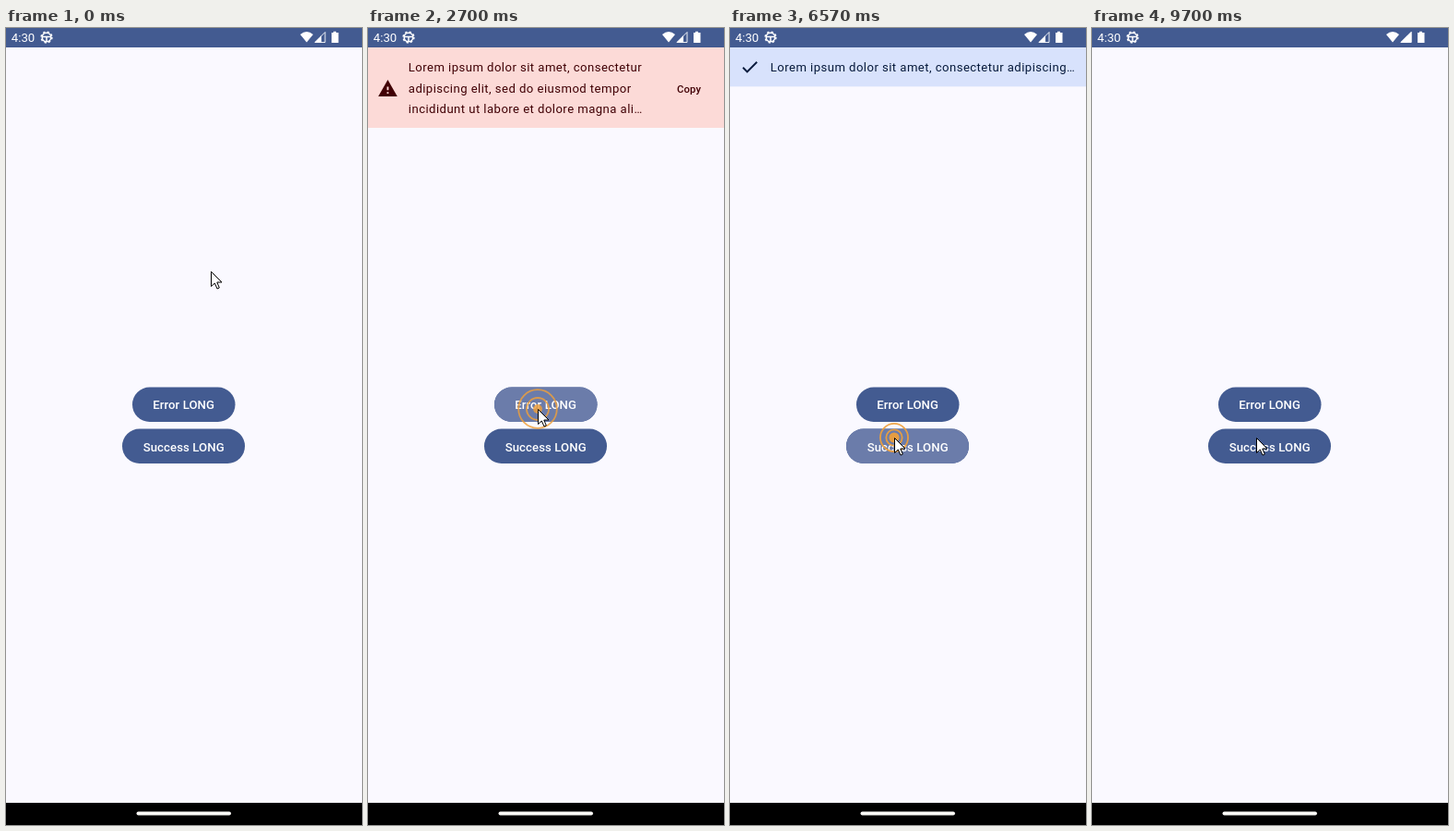
An HTML page that plays this animation: 386x862 px, repeating every 9760 ms.

```html
<!DOCTYPE html>
<html lang="en">
<head>
<meta charset="utf-8">
<title>Banner messages</title>
<style>
  html, body { margin: 0; width: 100%; height: 100%; overflow: hidden; background: #faf9ff; }
  svg { display: block; width: 386px; height: 862px; font-family: Roboto, sans-serif; }
  .primary { fill: #435b91; }
  .label { font-size: 13.13px; font-weight: 500; letter-spacing: .09px; fill: #fff; text-anchor: middle; }
  .body { font-size: 13.13px; letter-spacing: .445px; }
  .copy { font-size: 11.3px; font-weight: 500; letter-spacing: .1px; }
</style>
</head>
<body>
<svg viewBox="0 0 386 862">
  <defs>
    <clipPath id="errorClip"><rect x="137" y="388.500" width="111.500" height="37.500" rx="18.750"/></clipPath>
    <clipPath id="successClip"><rect x="126" y="433.500" width="133" height="37.500" rx="18.750"/></clipPath>
  </defs>
  <rect width="386" height="862" fill="#faf9ff"/>

  <g clip-path="url(#errorClip)">
    <rect class="primary" x="137" y="388" width="112" height="38"/>
    <circle id="errorInk" cx="184" cy="412" fill="#6b7caa"/>
  </g>
  <text class="label" x="192.700" y="412.300">Error LONG</text>
  <g clip-path="url(#successClip)">
    <rect class="primary" x="126" y="433" width="133" height="38"/>
    <circle id="successInk" cx="178" cy="443" fill="#6b7caa"/>
  </g>
  <text class="label" x="192.700" y="457.500">Success LONG</text>

  <g id="errorBanner" fill="#410005">
    <rect y="21" width="386" height="87" fill="#fcdad7"/>
    <path transform="translate(10.200 54.200) scale(.9375)" d="M1 21h22L12 2zm12-3h-2v-2h2zm0-4h-2v-4h2z"/>
    <g class="body">
      <text x="43.800" y="47">Lorem ipsum dolor sit amet, consectetur</text>
      <text x="43.800" y="69.500">adipiscing elit, sed do eiusmod tempor</text>
      <text x="43.800" y="92">incididunt ut labore et dolore magna ali…</text>
    </g>
    <text class="copy" x="335" y="70">Copy</text>
  </g>
  <g id="successBanner" fill="#071a3c">
    <rect y="21" width="386" height="45" fill="#d8e2fc"/>
    <path transform="translate(10.200 33.500) scale(.9375)" d="M9 16.170L4.830 12l-1.420 1.410L9 19 21 7l-1.410-1.410z"/>
    <text class="body" x="43.800" y="49.300">Lorem ipsum dolor sit amet, consectetur adipiscing…</text>
  </g>

  <rect class="primary" width="386" height="21"/>
  <g fill="#fff">
    <text x="5.800" y="15" font-size="13.200">4:30</text>
    <g fill="none" stroke="#fff">
      <circle cx="44" cy="10" r="4.800" stroke-width="1.500"/>
      <circle cx="44" cy="10" r="5.900" stroke-width="1.500" stroke-dasharray="2.300 2.334"/>
      <path d="M39.500 9.500H48.500M44 10v4.500" stroke-width="1.500"/>
    </g>
    <path d="M319 7Q326 1 333 7L326 15.500z"/>
    <path d="M335 15.500L346 4.500V15.500z" fill="none" stroke="#fff" stroke-width=".9"/>
    <path d="M334.500 15.700L342 8.200V15.700z"/>
    <path id="signal" d="M334.500 15.700L346.500 3.700V15.700z"/>
    <path d="M353 5h2V3.700h3V5h2.500V16H353z"/>
  </g>

  <rect y="838" width="386" height="24"/>
  <rect x="141.500" y="847.500" width="102.500" height="4" rx="2" fill="#faf9f6"/>

  <g id="click" fill="none" stroke="#f0a03a" stroke-width="1.800">
    <circle id="outer"/>
    <circle id="inner"/>
    <circle id="core" fill="#f0a03a" stroke="none"/>
  </g>
  <path id="cursor" d="M.5.5V16.500L4.300 13 7 19 9.300 18 6.800 12H12z" fill="#fff" stroke="#000"/>
</svg>
<script>
const LOOP = 9760;
const $ = id => document.getElementById(id);
const clamp = v => Math.min(1, Math.max(0, v));
const span = (t, a, b) => clamp((t - a) / (b - a));
const smooth = p => p * p * (3 - 2 * p);
const out = p => 1 - (1 - p) ** 3;
const set = (id, attrs) => { for (const k in attrs) $(id).setAttribute(k, attrs[k]); };

// start, end, destination, bend of the path
const moves = [
  [130, 470, [210, 277], [208, 272]],
  [930, 1000, [214, 282], [212, 280]],
  [1300, 2070, [184, 412], [92, 365]],
  [5400, 5770, [183, 412], [184, 412]],
  [5770, 6170, [178, 443], [179, 426]]
];

const clicks = [
  { at: 2330, x: 184, y: 412, name: 'error', height: 87, leave: 5400 },
  { at: 6330, x: 178, y: 443, name: 'success', height: 45, leave: 9400 }
];

function cursorAt(t) {
  let pos = [222, 263];
  for (const [a, b, to, bend] of moves) {
    const p = smooth(span(t, a, b)), q = 1 - p;
    pos = pos.map((v, i) => q * q * v + 2 * p * q * bend[i] + p * p * to[i]);
  }
  return pos.map(Math.round);
}

function drawClick({ at, x, y, name, height, leave }, t) {
  const age = t - at;
  const shown = out(span(age, 70, 350)) * (1 - smooth(span(t, leave, leave + 290)));
  set(name + 'Banner', { transform: `translate(0 ${-height * (1 - shown)})` });
  set(name + 'Ink', {
    r: age < 0 ? 0 : 115 * out(span(age, 0, 300)),
    opacity: 1 - span(age, 420, 640)
  });
  if (age < 0 || age > 870) return;
  const p = age / 870, grow = 1 - (1 - p) ** 2.2;
  set('click', { transform: `translate(${x} ${y})`, opacity: 1 - p * p });
  set('outer', { r: 29.5 * grow });
  set('inner', { r: 17 * grow });
  set('core', { r: 6 * (1 - p * p) });
}

function frame(now) {
  const t = now % LOOP;
  set('click', { opacity: 0 });
  clicks.forEach(c => drawClick(c, t));
  set('cursor', { transform: `translate(${cursorAt(t)})` });
  set('signal', { opacity: +(t >= 7730) });
  requestAnimationFrame(frame);
}
frame(0);
</script>
</body>
</html>
```
